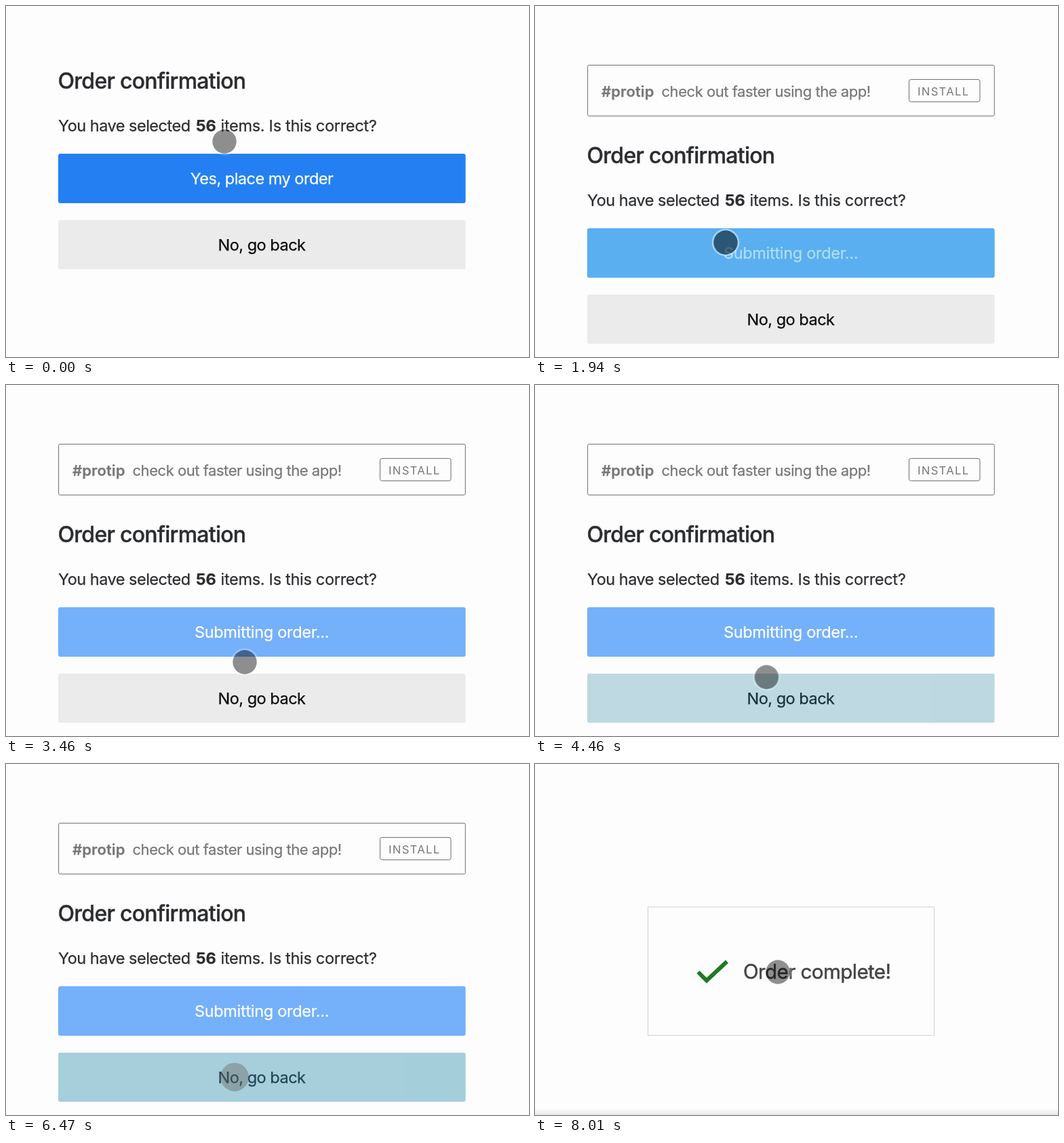
Write an HTML page that moves like this. It is 771 by 518 pixels and loops after 8.1 s.

```html
<!DOCTYPE html>
<html lang="en">
<head>
<meta charset="utf-8">
<title>Order confirmation</title>
<style>
html, body { margin: 0; width: 100%; height: 100%; overflow: hidden; background: #fdfdfd; }
svg { display: block; width: 771px; height: 518px; }
text {
  font: 400 23.5px Inter, "Open Sans", sans-serif;
  font-optical-sizing: none;
  letter-spacing: -.5px;
  color: #2b2d30;
  fill: currentColor;
  stroke: currentColor;
  stroke-width: .25px;
}
.mid { text-anchor: middle; }
.title { font-size: 32px; font-weight: 500; letter-spacing: -.73px; stroke-width: .4px; }
.loose { letter-spacing: -.3px; }
.bold { font-weight: 700; letter-spacing: 0; }
.banner text { font-size: 22px; letter-spacing: -.46px; color: #777; }
.banner .tag { font-weight: 600; letter-spacing: .1px; }
.banner .install { font-size: 16.5px; letter-spacing: 1.4px; stroke: none; }
.banner rect { fill: none; stroke: #6c6c6e; }
.white { color: #fff; }
.black { color: #0c0c0c; }
.done text { font-size: 29.5px; letter-spacing: -.55px; color: #444; stroke-width: .5px; }

.page, .banner, .form, .ask, .sent, .tap-yes, .tap-no, .done, .edge, .cursor, .dot, .ring {
  animation: 8.1s linear infinite;
}
.page { animation-name: page; }
.banner { animation-name: banner; animation-timing-function: step-end; }
.form { animation-name: shift; animation-timing-function: step-end; }
.ask { animation-name: ask; animation-timing-function: step-end; }
.sent { animation-name: sent; animation-timing-function: step-end; }
.tap-yes { animation-name: tap-yes; }
.tap-no { animation-name: tap-no; }
.done { animation-name: done; }
.edge { animation-name: edge; }
.cursor { animation-name: move; }
.dot { animation-name: press; }
.ring { animation-name: ring; }

@keyframes banner { 0% { opacity: 0; } 20%, 100% { opacity: 1; } }
@keyframes shift { 0% { transform: none; } 20%, 100% { transform: translateY(110px); } }
@keyframes ask { 0% { opacity: 1; } 22.96%, 100% { opacity: 0; } }
@keyframes sent { 0% { opacity: 0; } 22.96%, 100% { opacity: 1; } }
@keyframes page { 0%, 82.9% { opacity: 1; } 86.9%, 100% { opacity: 0; } }
@keyframes done { 0%, 82.5% { opacity: 0; } 86.6%, 100% { opacity: 1; } }
@keyframes edge { 0%, 89.4% { opacity: 0; } 94.2%, 100% { opacity: 1; } }

@keyframes tap-yes {
  0%, 21.4% { opacity: 0; }
  22.2%, 25.4% { opacity: 1; }
  27.8%, 100% { opacity: 0; }
}
@keyframes tap-no {
  0%, 45.8% { opacity: 0; }
  46.4%, 48% { opacity: 1; }
  50%, 51.9% { opacity: 0; }
  52.5%, 54.1% { opacity: 1; }
  56.2%, 64.9% { opacity: 0; }
  65.6%, 68.6% { opacity: 1; }
  70.8%, 72.9% { opacity: 0; }
  73.5%, 75% { opacity: 1; }
  77%, 77.8% { opacity: 0; }
  78.4%, 79.2% { opacity: 1; }
  79.9% { opacity: .82; }
  81.9%, 100% { opacity: 0; }
}
@keyframes press {
  0%, 20.8% { fill: #000; fill-opacity: .44; r: 17.7px; }
  21.5%, 24.4% { fill: #000; fill-opacity: .51; r: 17.7px; }
  25.5%, 45.4% { fill: #000; fill-opacity: .44; r: 17.7px; }
  46%, 47.5% { fill: #000; fill-opacity: .51; r: 17.7px; }
  48.4%, 51.6% { fill: #000; fill-opacity: .44; r: 17.7px; }
  52.2%, 53.7% { fill: #000; fill-opacity: .51; r: 17.7px; }
  54.6%, 64.6% { fill: #000; fill-opacity: .44; r: 17.7px; }
  65.4%, 68.4% { fill: #000; fill-opacity: .51; r: 17.7px; }
  69.4%, 72.4% { fill: #000; fill-opacity: .44; r: 17.7px; }
  73%, 74.6% { fill: #000; fill-opacity: .51; r: 17.7px; }
  75.6%, 77.4% { fill: #000; fill-opacity: .44; r: 17.7px; }
  78%, 79% { fill: #000; fill-opacity: .51; r: 17.7px; }
  79.7%, 80.1% { fill: #645f5f; fill-opacity: .4; r: 21px; }
  81.4%, 87% { fill: #000; fill-opacity: .51; r: 17.7px; }
  89%, 100% { fill: #000; fill-opacity: .44; r: 17.7px; }
}
@keyframes ring {
  0%, 20.8% { opacity: .25; }
  21.5%, 24.4% { opacity: .45; }
  25.5%, 64.6% { opacity: .25; }
  65.4%, 68.4% { opacity: .45; }
  69.4%, 79% { opacity: .25; }
  79.7%, 80.1% { opacity: 0; }
  81.4%, 100% { opacity: .25; }
}
@keyframes move {
  0%, .8% { transform: translate(322px, 200px); }
  1.8% { transform: translate(308px, 192px); }
  2.8% { transform: translate(330px, 187px); }
  3.8% { transform: translate(361px, 194px); }
  4.7%, 8.6% { transform: translate(342px, 204px); }
  10.4% { transform: translate(460px, 190px); }
  12.2% { transform: translate(290px, 128px); }
  13.8% { transform: translate(148px, 205px); }
  15.2% { transform: translate(240px, 325px); }
  16.05%, 29.6% { transform: translate(281px, 349px); }
  31.6% { transform: translate(230px, 290px); }
  34% { transform: translate(340px, 136px); }
  36% { transform: translate(556px, 230px); }
  38.3% { transform: translate(440px, 462px); }
  39.9%, 42.9% { transform: translate(352px, 409px); }
  45%, 54.6% { transform: translate(340px, 462px); }
  58%, 59.5% { transform: translate(350px, 240px); }
  61.8% { transform: translate(346px, 392px); }
  64.2%, 70% { transform: translate(340px, 462px); }
  73%, 88.5% { transform: translate(337px, 462px); }
  94.2%, 95.5% { transform: translate(290px, 412px); }
  97.3% { transform: translate(446px, 350px); }
  98.8%, 100% { transform: translate(358px, 307px); }
}
</style>
</head>
<body>
<svg viewBox="0 0 771 518">
  <defs>
    <linearGradient id="fade" x2="0" y2="1">
      <stop stop-color="#fdfdfd"/>
      <stop offset="1" stop-color="#e9e9e9"/>
    </linearGradient>
  </defs>

  <g class="page">
    <g class="banner">
      <rect x="77.6" y="87.3" width="599.6" height="75" rx="2"/>
      <text class="tag" x="98" y="133.5">#protip</text>
      <text x="186.5" y="133.5">check out faster using the app!</text>
      <rect x="551.4" y="108.4" width="104.5" height="33" rx="3"/>
      <text class="install" x="564" y="132">INSTALL</text>
    </g>
    <g class="form">
      <text class="title" x="76.5" y="122">Order confirmation</text>
      <text x="77" y="184.5">You have selected</text>
      <text class="bold" x="280" y="184.5">56</text>
      <text class="loose" x="316.5" y="184.5">items. Is this correct?</text>

      <g class="ask">
        <rect x="77" y="218" width="600.5" height="73" rx="3" fill="#2480f2"/>
        <text class="mid white" x="377" y="263">Yes, place my order</text>
      </g>
      <g class="sent">
        <rect x="77" y="218" width="600.5" height="73" rx="3" fill="#75b0fa"/>
        <text class="mid white loose" x="377" y="263">Submitting order...</text>
      </g>
      <rect class="tap-yes" x="77" y="218" width="600.5" height="73" rx="3" fill="#33b0e2" fill-opacity=".4"/>

      <rect x="77" y="316" width="600.5" height="72.5" rx="3" fill="#ebebeb"/>
      <text class="mid black" x="377" y="361">No, go back</text>
      <rect class="tap-no" x="77" y="316" width="600.5" height="72.5" rx="3" fill="#3ca3c3" fill-opacity=".48"/>
    </g>
  </g>

  <g class="done">
    <rect x="166.5" y="211" width="422" height="189.5" fill="none" stroke="#d2d2d2"/>
    <polyline points="240.5,307 253,319.5 283,291.5" fill="none" stroke="#1f7a24" stroke-width="6"/>
    <text x="307" y="317">Order complete!</text>
  </g>
  <rect class="edge" y="508" width="771" height="10" fill="url(#fade)"/>

  <g class="cursor">
    <circle class="ring" r="19" fill="none" stroke="#fff" stroke-width="2.6"/>
    <circle class="dot" r="17.7"/>
  </g>
</svg>
</body>
</html>
```
